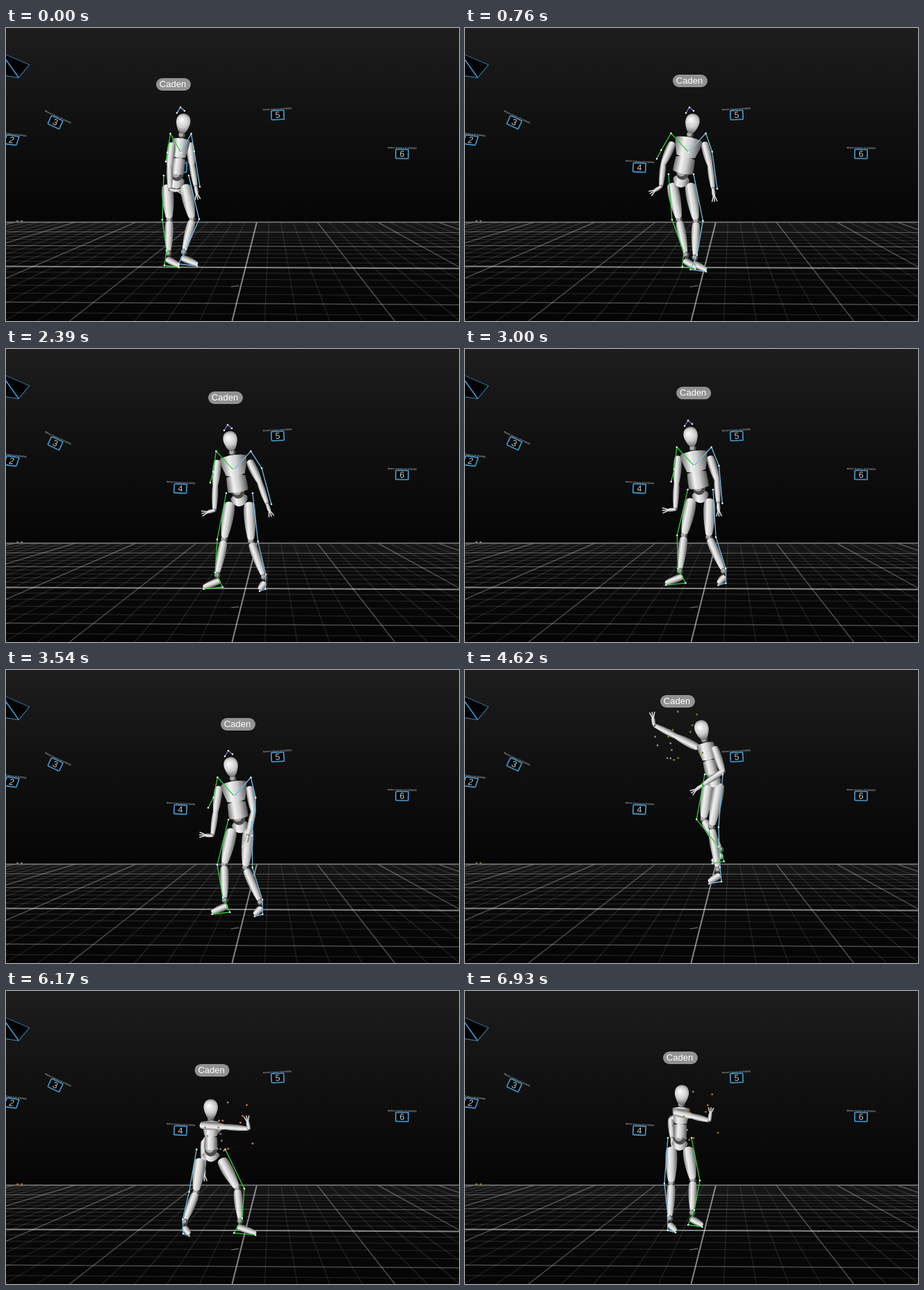
An HTML page with a canvas that plays this animation: 652x421 px, repeating every 7.01 s.

```html
<!DOCTYPE html>
<html lang="en">
<head>
<meta charset="utf-8">
<title>Motion capture stage</title>
<style>
html, body { margin: 0; width: 100%; height: 100%; overflow: hidden; background: #080808; }
canvas { display: block; width: 652px; height: 421px; }
</style>
</head>
<body>
<canvas id="stage" width="652" height="421"></canvas>
<script>
const W = 652, H = 421, LOOP = 7010, STEP = 77.1, LAST = 90;
const GREEN = '#30cf3c', BLUE = '#72bde2', LILAC = '#8573d0', EDGE = '#3f93c4';
const ctx = document.getElementById('stage').getContext('2d');

// Key poses. arm: wrist x, y and elbow bend. leg: ankle x, y and knee bend.
// girth: half width of shoulders and hips. face: toe direction and wrist curl.
// leap: body offset at the height of the move to the next pose.
// A tint marks poses whose upper body markers are loose.
const poses = [
  { at: 0, near: 'A', leap: [0, 0], tag: [241, 81], head: [255, 137], pelvis: [245, 222], girth: [13, 13],
    armA: [236, 232, 2], armB: [273, 228, 1], legA: [234, 324, -2], legB: [256, 322, -11], face: [17, -1.4] },
  { at: 10, near: 'A', leap: [20, -36], tag: [324, 76], head: [327, 137], pelvis: [311, 220], girth: [23, 13],
    armA: [282, 228, 5], armB: [357, 231, -2], legA: [318, 326, 0], legB: [331, 330, -5], face: [12, 0.9] },
  { at: 31, near: 'A', leap: [4, -20], tag: [316, 70], head: [323, 132], pelvis: [336, 217], girth: [23, 14],
    armA: [300, 232, 1], armB: [376, 223, -2], legA: [304, 325, -1], legB: [371, 328, 8], face: [-13, 1.3] },
  { at: 46, near: 'B', leap: [22, 0], tag: [334, 78], head: [324, 139], pelvis: [337, 225], girth: [22, 12],
    armA: [297, 238, 0], armB: [348, 238, -7], legA: [315, 331, 6], legB: [366, 334, 13], face: [-14, 1.5] },
  { at: 60, near: 'B', leap: [45, 14], tag: [306, 45], head: [341, 86], pelvis: [358, 160], girth: [12, 8],
    armA: [272, 79, 0], armB: [341, 166, -22], legA: [368, 258, 16], legB: [364, 287, 10], face: [-14, 0.95], tint: '#887a28' },
  { at: 71, near: 'A', leap: [0, 0], tag: [288, 120], head: [287, 176], pelvis: [291, 242], girth: [18, -16],
    armA: [341, 195, 0], armB: [281, 276, 10], legA: [347, 332, -11], legB: [241, 335, -7], face: [13, -1.7], tint: '#dc7026' },
  { at: 90, near: 'A', leap: [0, 0], tag: [310, 96], head: [312, 149], pelvis: [309, 221], girth: [9, -12],
    armA: [352, 186, 0], armB: [298, 212, 15], legA: [327, 319, -4], legB: [295, 327, -1], face: [11, -1.7], tint: '#b27a2a' }
];
const tracks = ['tag', 'head', 'pelvis', 'girth', 'armA', 'armB', 'legA', 'legB', 'face'];

const shifted = ([x, y], dx, dy) => [x + dx, y + dy];
const between = (a, b, u) => [a[0] + (b[0] - a[0]) * u, a[1] + (b[1] - a[1]) * u];
const noise = n => { const v = Math.sin(n * 127.1 + 11) * 43758.5; return v - Math.floor(v); };

function line(points, color, width) {
  ctx.strokeStyle = color;
  ctx.lineWidth = width;
  ctx.beginPath();
  for (const p of points) ctx.lineTo(...p);
  ctx.stroke();
}
function dot([x, y], r, color) {
  ctx.fillStyle = color;
  ctx.beginPath();
  ctx.arc(x, y, r, 0, 7);
  ctx.fill();
}
function text(string, x, y, size, color, weight = '') {
  ctx.font = `${weight} ${size}px "Liberation Sans", Arial, sans-serif`;
  ctx.textAlign = 'center';
  ctx.textBaseline = 'middle';
  ctx.fillStyle = color;
  ctx.fillText(string, x, y);
}
function fade(y1, y2, ...colors) {
  const g = ctx.createLinearGradient(0, y1, 0, y2);
  colors.forEach((c, i) => g.addColorStop(i / (colors.length - 1), c));
  ctx.fillStyle = g;
  ctx.fillRect(0, y1, W, y2 - y1);
}

function drawRoom() {
  fade(0, 279, '#1d1d1d', '#101010', '#050505');
  fade(279, H, '#0b0b0b', '#050505');
  const vanish = [382, 195];
  const grid = (a, b, i, axis) => {
    if (i === axis) line([a, b], 'rgba(255,255,255,.5)', 2);
    else if (i % 5 === 0) line([a, b], 'rgba(255,255,255,.28)', 1.5);
    else line([a, b], 'rgba(255,255,255,.1)', 1.4);
  };
  for (let j = -70; j <= 70; j++) {
    const top = [361 + j * 17.4, 279];
    grid(top, between(vanish, top, (H - vanish[1]) / 84), j, 0);
  }
  for (let i = 0; i < 23; i++) {
    const y = vanish[1] + 1 / (0.0119 - i * 0.000346), tilt = i * 0.1;
    grid([0, y - tilt], [W, y + tilt], i, 15);
  }
  line([[0, 279], [W, 279]], '#747474', 1.5);
  line([[324, 372], [335, 370]], '#777', 1.2);
  line([[507, 346], [517, 344]], '#888', 1.2);
}

function drawCamera(number, x, y, angle, skew = 0) {
  ctx.save();
  ctx.translate(x, y);
  ctx.rotate(angle);
  text('Motion Camera 10 (218430)', 0, -8.5, 3.2, '#aaa', 'bold');
  ctx.transform(1, 0, skew, 1, 0, 0);
  ctx.fillStyle = '#020202';
  ctx.strokeStyle = EDGE;
  ctx.lineWidth = 1.8;
  ctx.beginPath();
  ctx.roundRect(-9, -6.5, 18, 13, 1);
  ctx.fill();
  ctx.stroke();
  text(number, 0, 0.7, 12.5, '#ccc');
  ctx.restore();
}
function drawCameras() {
  const body = [[-2, 38], [33, 53], [18, 71], [-2, 68]];
  line(body, EDGE, 1.7);
  ctx.fillStyle = '#020202';
  ctx.fill();
  line([[-2, 43], [18, 71]], EDGE, 1.7);
  drawCamera('2', 8, 161, 0.13, -0.2);
  drawCamera('3', 71, 135.5, 0.44);
  drawCamera('4', 251, 200.5, 0.06);
  drawCamera('5', 391, 125, -0.05);
  drawCamera('6', 570, 181, 0.02);
}

// A tapered solid from a to b, lit from the left; end sets how square its ends are.
function solid(a, b, r1, r2, bulge = 1.12, end = 0.72) {
  if (b[1] < a[1]) [a, b, r1, r2] = [b, a, r2, r1];
  const len = Math.hypot(b[0] - a[0], b[1] - a[1]), r = Math.max(r1, r2), cap = 1.4 - end * 1.2;
  ctx.save();
  ctx.translate(...a);
  ctx.rotate(Math.atan2(b[1] - a[1], b[0] - a[0]) - Math.PI / 2);
  const light = ctx.createLinearGradient(-r, 0, r, 0);
  light.addColorStop(0, '#6c6c6c');
  light.addColorStop(0.33, '#f2f2f2');
  light.addColorStop(0.6, '#cdcdcd');
  light.addColorStop(1, '#4c4c4c');
  ctx.fillStyle = light;
  ctx.beginPath();
  ctx.moveTo(-r1 * end, 0);
  ctx.bezierCurveTo(-r1 * bulge, len * 0.25, -r2 * bulge, len * 0.75, -r2 * end, len);
  ctx.quadraticCurveTo(0, len + r2 * cap, r2 * end, len);
  ctx.bezierCurveTo(r2 * bulge, len * 0.75, r1 * bulge, len * 0.25, r1 * end, 0);
  ctx.quadraticCurveTo(0, -r1 * cap, -r1 * end, 0);
  ctx.fill();
  ctx.restore();
}
function joint(p, r) {
  dot(p, r, '#4c4c4c');
  dot(shifted(p, -r * 0.2, -r * 0.2), r * 0.65, '#aaa');
}

// The middle joint lies off the line between the limb's ends by its bend.
function bent(a, [x, y, bend]) {
  const dx = x - a[0], dy = y - a[1], len = Math.hypot(dx, dy) || 1;
  return shifted(between(a, [x, y], 0.5), -dy / len * bend, dx / len * bend);
}
function buildBody(pose) {
  const { head, pelvis, girth, face } = pose;
  const chest = between(head, pelvis, 0.34);
  const body = { chest };
  for (const [side, sign] of [['A', -1], ['B', 1]]) {
    const arm = pose['arm' + side], leg = pose['leg' + side];
    const shoulder = shifted(chest, sign * girth[0], 0), hip = shifted(pelvis, sign * girth[1], 5);
    const elbow = bent(shoulder, arm), wrist = arm.slice(0, 2);
    const knee = bent(hip, leg), ankle = leg.slice(0, 2);
    const aim = Math.atan2(wrist[1] - elbow[1], wrist[0] - elbow[0]) + (side === 'A' ? face[1] : 0);
    const toe = shifted(ankle, face[0] + (ankle[0] - pelvis[0]) * 0.2, 17);
    body[side] = { shoulder, elbow, wrist, aim, hip, knee, ankle, toe,
      out: sign * Math.max(-1, Math.min(1, girth[1] / 8)) };
  }
  return body;
}

function drawArm({ shoulder, elbow, wrist, aim }) {
  const reach = (r, turn = 0) => shifted(wrist, Math.cos(aim + turn) * r, Math.sin(aim + turn) * r);
  joint(elbow, 4);
  solid(shoulder, elbow, 6.5, 5);
  solid(elbow, wrist, 5, 3.5);
  joint(wrist, 2.5);
  solid(wrist, reach(10), 2.6, 3);
  for (const turn of [-0.2, 0, 0.2]) line([reach(8), reach(19, turn)], '#ddd', 1.5);
}
function drawLeg({ hip, knee, ankle, toe }) {
  joint(knee, 5);
  solid(hip, between(knee, hip, 0.07), 9.5, 6.5);
  solid(between(knee, ankle, 0.07), between(ankle, knee, 0.08), 7, 4.5);
  joint(ankle, 4.5);
  solid(shifted(ankle, (ankle[0] - toe[0]) * 0.15, 8), toe, 5.5, 4);
}
function drawTorso({ head, pelvis, girth }) {
  const at = u => between(head, pelvis, u);
  const half = Math.max(13, girth[0] - 3);
  solid(at(0.93), at(1.08), Math.abs(girth[1]) * 0.4 + 8, 9);
  joint(at(0.87), 9);
  solid(at(0.6), at(0.85), half * 0.72, half * 0.76, 1, 0.95);
  joint(at(0.2), 5);
  solid(at(0.27), at(0.57), half, half * 0.72, 1.05, 0.95);
  ctx.save();
  ctx.translate(...head);
  ctx.rotate(Math.atan2(head[0] - pelvis[0], pelvis[1] - head[1]));
  const light = ctx.createRadialGradient(-3, -5, 1, 0, 0, 16);
  light.addColorStop(0, '#fafafa');
  light.addColorStop(0.5, '#cecece');
  light.addColorStop(1, '#5c5c5c');
  ctx.fillStyle = light;
  ctx.fill(new Path2D('M0-14C8-14 11-7 10 0 8 8 5 15 0 15S-8 8-10 0C-11-7-8-14 0-14Z'));
  ctx.restore();
}

function drawWire(points, color) {
  line(points, color, 1.3);
  for (const p of points) dot(p, 1.3, '#dff0f4');
}
function drawMarkers(pose, body) {
  const { head, key } = pose;
  for (const [side, color] of [['B', BLUE], ['A', GREEN]]) {
    const { shoulder, elbow, wrist, hip, knee, ankle, toe, out } = body[side];
    drawWire([shifted(hip, out * 5, -15), shifted(knee, out * 10, 0), shifted(ankle, out * 3, -4),
      shifted(ankle, (ankle[0] - toe[0]) * 0.4, 17), shifted(toe, 0, 3)], color);
    if (!key.tint) drawWire([shifted(body.chest, 0, 13), shifted(shoulder, out * 2, -14),
      shifted(elbow, out * 3, -20), shifted(wrist, out * 6, side === 'A' ? -40 : 0)], color);
  }
  if (!key.tint) {
    drawWire([shifted(head, -9, -15), shifted(head, -4, -23), shifted(head, 2, -18)], key.at ? LILAC : BLUE);
    return;
  }
  const middle = between(body.chest, body.A.wrist, 0.5);
  for (let n = 0; n < 16; n++)
    dot(shifted(middle, noise(n) * 76 - 38, noise(n + 50) * 76 - 38), 1.4, n % 2 ? '#888' : key.tint);
}

// Catmull-Rom through the key poses, with steps, and a leap late in each move.
function poseAt(frame) {
  let i = poses.findIndex(p => p.at > frame) - 1;
  if (i < 0) i = poses.length - 2;
  const a = poses[i], b = poses[i + 1];
  const before = poses[i - 1] || a, after = poses[i + 2] || b;
  const span = b.at - a.at, u = (frame - a.at) / span;
  const pose = { key: u < 0.5 ? a : b };
  for (const track of tracks) {
    pose[track] = a[track].map((v, n) => {
      const w = b[track][n];
      const m1 = (w - before[track][n]) / (b.at - before.at) * span * 0.7;
      const m2 = (after[track][n] - v) / (after.at - a.at) * span * 0.7;
      return v + (w - v) * u * u * (3 - 2 * u) + m1 * u * (1 - u) ** 2 - m2 * u * u * (1 - u);
    });
  }
  const step = Math.sin(2 * Math.PI * u * Math.max(1, Math.round(span / 12)));
  pose.legA[1] -= 8 * Math.max(0, step);
  pose.legB[1] -= 8 * Math.max(0, -step);
  const arc = Math.max(0, 1 - ((u - 0.7) / 0.27) ** 2);
  pose.shift = a.leap.map(v => v * arc);
  return pose;
}

function drawActor(pose) {
  const { key, tag } = pose, body = buildBody(pose);
  const near = body[key.near], far = body[key.near === 'A' ? 'B' : 'A'];
  ctx.save();
  ctx.translate(...pose.shift);
  drawArm(far);
  drawLeg(far);
  drawLeg(near);
  drawTorso(pose);
  drawArm(near);
  drawMarkers(pose, body);
  ctx.fillStyle = '#929292';
  ctx.beginPath();
  ctx.roundRect(tag[0] - 25, tag[1] - 9, 50, 18, 9);
  ctx.fill();
  text('Caden', tag[0] - 1, tag[1] + 0.5, 13, '#fff');
  ctx.restore();
  for (const x of [16.5, 22.5]) dot([x, 277.5], 1.3, key.tint || '#888');
}

const start = performance.now();
function tick() {
  const time = (performance.now() - start) % LOOP;
  drawRoom();
  drawCameras();
  drawActor(poseAt(Math.min(LAST, Math.floor((time + 15) / STEP))));
  requestAnimationFrame(tick);
}
tick();
</script>
</body>
</html>
```
